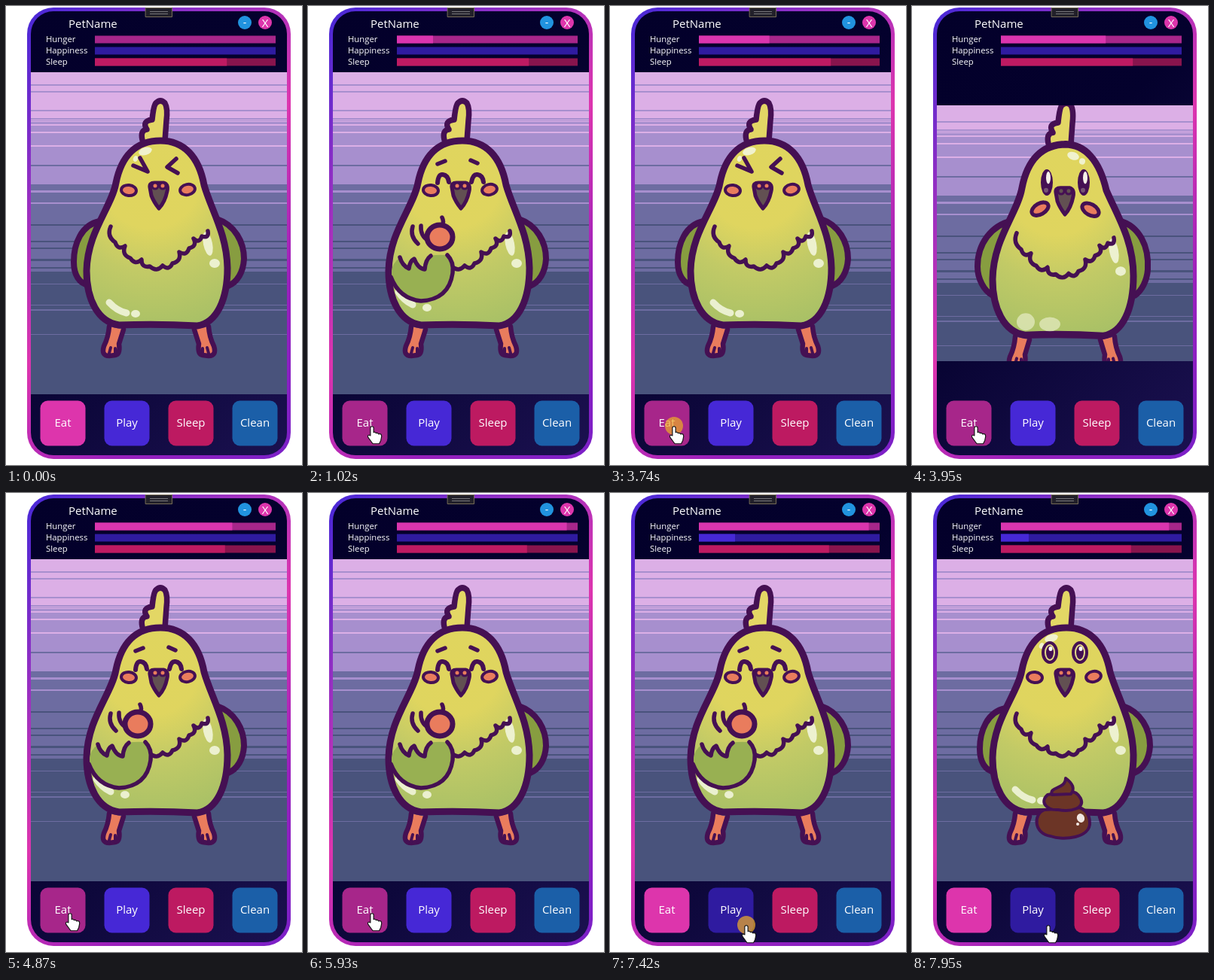
Write an HTML page with a canvas that moves like this. It is 393 by 610 pixels and loops after 8000 ms.

```html
<!DOCTYPE html>
<html lang="en">
<head>
<meta charset="utf-8">
<title>Desktop pet</title>
<style>
html, body { margin: 0; width: 100%; height: 100%; overflow: hidden; background: #fff; }
canvas { display: block; }
</style>
</head>
<body>
<canvas id="stage" width="393" height="610"></canvas>
<script>
const ctx = document.getElementById('stage').getContext('2d');
const LOOP = 8000;
const INK = '#451053', ORANGE = '#e97c5d', SHINE = 'rgba(243,246,222,.88)';
const FONT = '"Open Sans", "Noto Sans", sans-serif';
const BANDS = ['#dcafe6', '#a78fce', '#6d6ca1', '#49537c'];

// Step tracks: [time, value]
const POSE = [[0, 'squint'], [950, 'eat'], [1880, 'squint'], [2410, 'jump'], [2880, 'squint'],
  [3880, 'jump'], [4870, 'eat'], [5330, 'jump'], [5860, 'eat'], [6390, 'jump'],
  [6940, 'squint'], [7150, 'jump'], [7420, 'eat'], [7950, 'mess']];
const HUNGER = [[0, 0], [950, 20], [1880, 19], [2340, 39], [3810, 58], [4740, 77], [4870, 76],
  [5790, 95], [5860, 94], [7950, 93]];
const HAPPY = [[0, 0], [7420, 20], [7950, 15.4]];
const SLEEP = [[0, 73], [4870, 72]];
const CLICKS = [[950, 1020], [2340, 2480], [3740, 3880], [4740, 4870], [5790, 5930], [7420, 7490]];
const BUTTONS = [
  ['Eat', 45.5, '#dd35ac', '#a7268a'], ['Play', 130.5, '#4628d6', '#2f1ba0'],
  ['Sleep', 215.5, '#bd1a61', '#8a1450'], ['Clean', 300.5, '#1b5fa8', '#174f8c']];

const at = (track, t) => track.reduce((v, k) => t >= k[0] ? k[1] : v, track[0][1]);

function shape(d, fill, line = INK, width = 8) {
  const p = new Path2D(d);
  if (fill) { ctx.fillStyle = fill; ctx.fill(p); }
  if (line) { ctx.strokeStyle = line; ctx.lineWidth = width; ctx.stroke(p); }
}

function oval(x, y, rx, ry, fill, turn = 0, width = 0) {
  ctx.beginPath();
  ctx.ellipse(x, y, rx, ry, turn, 0, 7);
  ctx.fillStyle = fill;
  ctx.fill();
  if (width) { ctx.strokeStyle = INK; ctx.lineWidth = width; ctx.stroke(); }
}

function box(x, y, w, h, r, fill) {
  ctx.beginPath();
  ctx.roundRect(x, y, w, h, r);
  ctx.fillStyle = fill;
  ctx.fill();
}

function label(s, x, y, size, align = 'left') {
  ctx.font = '500 ' + size + 'px ' + FONT;
  ctx.textAlign = align;
  ctx.fillStyle = '#fff';
  ctx.fillText(s, x, y);
}

function withStops(g, ...stops) {
  stops.forEach(([p, c]) => g.addColorStop(p, c));
  return g;
}

function mirrored(draw) {
  draw();
  ctx.save();
  ctx.translate(406, 0);
  ctx.scale(-1, 1);
  draw();
  ctx.restore();
}

function sky(dy) {
  [88, 152, 239, 353].forEach((y, i) => {
    ctx.fillStyle = BANDS[i];
    ctx.fillRect(33, y + dy - (i ? 0 : 30), 340, 516 - y + 40);
  });
  // y, height, band colour
  [[104, 2, 1], [113, 2, 1], [138, 2, 1], [149, 2, 1], [153, 1, 0], [157, 2, 0], [167, 2, 0],
   [185, 2, 0], [211, 2, 2], [237, 2, 2], [245, 3, 1], [261, 2, 1], [290, 2, 3],
   [312, 2, 3], [321, 2, 3], [336, 3, 3], [347, 2, 3], [369, 1, 2],
   [397, 1, 2], [403, 2, 2], [436, 1, 2]].forEach(([y, h, c]) => {
    ctx.fillStyle = BANDS[c];
    ctx.fillRect(33, y + dy, 340, h);
  });
}

function scallops(from) {
  const pts = [[139, 293], [145, 314], [158, 319], [165, 335], [180, 337], [191, 346], [208, 345],
    [221, 342], [230, 327], [243, 322], [249, 309], [260, 306], [268, 299]].slice(from);
  let d = 'M' + pts[0];
  for (let i = 1; i < pts.length; i++) {
    const [ax, ay] = pts[i - 1], [bx, by] = pts[i];
    const len = Math.hypot(bx - ax, by - ay);
    const cx = (ax + bx) / 2 - (by - ay) / len * 9, cy = (ay + by) / 2 + (bx - ax) / len * 9;
    d += `Q${cx} ${cy} ${bx} ${by}`;
  }
  shape(d, null, INK, 5.5);
}

function foot() {
  shape('M137 426Q136 440 130 452Q126 465 137 465L145 464Q152 463 150 449L156 430', ORANGE, INK, 6.5);
  shape('M136 465L139 454M145 464L145 455', null, INK, 4);
}

function cheeksAndBeak(jump) {
  if (jump) {
    oval(170, 262, 12, 7, ORANGE, -.5, 5);
    oval(237, 263, 12, 7, ORANGE, .5, 5);
  } else {
    oval(163, 245, 10, 7, ORANGE, .1, 4);
    oval(241, 244, 10, 7, ORANGE, -.2, 4);
  }
  shape('M191 241Q190 235 197 235L209 235Q216 237 214 246Q211 261 203 269Q196 260 193 252Z', '#625052', INK, 5);
  const nostril = jump ? '#625052' : ORANGE;
  oval(198, 239, 4, 4, nostril, 0, 3);
  oval(208, 239, 4, 4, nostril, 0, 3);
}

const EYES = {
  squint() {
    shape('M178 202L188 220L169 212M226 203L214 214L228 222', null, INK, 5.5);
  },
  eat() {
    shape('M172 235Q173 223 179 224Q186 225 187 234M217 234Q219 223 225 224Q232 225 233 234', null, INK, 6);
    shape('M172 210L182 206M216 205L225 209', null, INK, 5.5);
  },
  jump() {
    [179, 228].forEach(x => {
      oval(x, 228, 8, 17, INK);
      oval(x + 2, 222, 3, 8, '#f5f1e8');
      oval(x - 1, 238, 3, 3, '#765374');
    });
  },
  mess() {
    [183, 223].forEach(x => {
      oval(x, 212, 9, 13, '#e4dc87', 0, 4);
      oval(x, 212, 5, 9, INK);
      oval(x + 1, 207, 2.5, 3, '#fff');
    });
  }
};

function foldedWing() {
  shape('M178 291Q181 287 178 281M139 293Q135 306 146 316M150 292Q149 306 160 312', null, INK, 5.5);
  oval(175, 307, 17, 16, ORANGE, 0, 7);
  shape('M111 352Q112 342 122 334Q125 345 134 349Q135 339 141 336Q146 349 155 350Q156 337 163 332Q169 330 185 331Q194 340 192 355Q187 390 150 392Q121 389 111 360Z', '#98b052', null);
  shape('M122 334Q125 345 134 349Q135 339 141 336Q146 349 155 350Q156 337 163 332M185 331Q194 340 192 355Q187 390 150 392Q121 389 110 360', null, INK, 5.5);
}

function mess() {
  const brown = '#6c3526';
  shape('M176 421C160 427 162 453 184 456C200 462 238 459 236 437Q235 422 222 418Z', brown, INK, 4);
  shape('M180 401C168 412 181 422 194 421C212 424 230 419 224 406Q219 396 207 396Z', brown, INK, 4);
  shape('M186 401C181 390 204 394 204 379Q219 390 211 400Z', brown, INK, 4);
  oval(224, 432, 5, 6, '#f1e7e2', -.4);
  oval(220, 440, 2, 2, '#f1e7e2');
}

function body(jump) {
  const right = jump ? 'C294 302 272 270 258 238C249 200 230 179 203 179'
                     : 'C293 302 272 270 263 238C256 200 236 179 205 179';
  const fill = withStops(ctx.createRadialGradient(192, 230, 0, 192, 230, 205),
    [0, '#e0d55d'], [.32, '#dfd55f'], [.6, '#c2ca66'], [1, '#a7c066']);
  shape('M205 179C172 179 153 200 146 235C140 268 108 300 107 352C107 390 122 420 150 424Q202 422 254 425C280 421 294 390 294 348' + right + 'Z', fill, INK, 9);
}

function bird(pose) {
  const jump = pose === 'jump', eat = pose === 'eat';
  const wing = '#879d40';
  ctx.save();
  if (jump) {
    ctx.translate(0, -1.5);
    ctx.scale(1, 1.035);
  }
  mirrored(foot);
  if (jump) {
    shape('M133 277C105 283 87 307 87 336C87 351 95 367 107 373', wing);
    shape('M275 277C302 284 315 310 313 340C312 354 305 367 296 373', wing);
  } else {
    if (!eat) shape('M124 286C100 291 90 316 90 340C90 357 97 369 110 371', wing);
    shape('M280 283C304 291 316 314 316 336C315 354 307 367 295 372', wing);
  }
  shape('M181 178Q178 165 187 164Q180 153 194 151Q196 132 199 129Q205 123 211 129Q215 136 213 152L211 179', '#e3d765', INK, 7.5);
  body(jump);
  if (jump) {
    oval(214, 194, 8, 5, SHINE, .3);
    oval(226, 201, 4, 4, SHINE, .3);
    oval(151, 407, 12, 11, 'rgba(240,243,214,.6)');
    oval(183, 410, 14, 9, 'rgba(240,243,214,.6)');
  } else if (eat) {
    shape('M120 380Q127 391 139 397', null, SHINE, 9);
    oval(158, 401, 6, 5, SHINE);
  } else {
    oval(185, 193, 9, 5, SHINE, -.3);
    oval(172, 203, 3, 4, SHINE, .4);
    oval(172, 409, 6, 5, SHINE);
    shape('M137 394Q147 405 160 408', null, SHINE, 9);
  }
  oval(268, 316, 6, 16, SHINE, -.2);
  oval(277, 342, 7, 6, SHINE);
  scallops(eat ? 5 : 0);
  if (eat) foldedWing();
  EYES[pose]();
  cheeksAndBeak(jump);
  if (pose === 'mess') mess();
  ctx.restore();
}

function cursorAt(t) {
  if (t < 130) return null;
  if (t < 6940) {
    const p = Math.min(1, Math.floor((t - 130) / 75 + .01) / 9);
    const e = 1 - (1 - p) ** 2;
    return [300 - 215 * e, 598 - 40 * e ** 2];
  }
  const q = Math.min(3, Math.floor((t - 6940) / 70)) / 3;
  return [98 + 83 * q, 558 + 16 * q];
}

function hand([x, y]) {
  ctx.save();
  ctx.translate(x, y);
  ctx.scale(1.06, 1.08);
  shape('M-2 2Q0 -1 2 2L2 8Q4 7 5 9Q7 8 8 10Q12 9 12 13L11 18L9 22L1 22L-5 14Q-6 10 -2 12Z', '#fff', '#111', 1.1);
  ctx.restore();
}

function bar(name, y, value, fill, empty) {
  label(name, 53, y + 9, 11.3);
  ctx.fillStyle = empty;
  ctx.fillRect(118, y + .5, 240, 10);
  ctx.fillStyle = fill;
  ctx.fillRect(118, y + .5, 2.4 * value, 10);
}

function header(t) {
  label('PetName', 83, 29, 15);
  oval(317, 22, 9, 9, '#2193df');
  oval(344, 22, 9, 9, '#dd35ac');
  label('-', 317, 27, 14, 'center');
  label('X', 344, 27.5, 15, 'center');
  bar('Hunger', 39, at(HUNGER, t), '#da35ae', '#a7268a');
  bar('Happiness', 54, at(HAPPY, t), '#4628d6', '#2f1ba0');
  bar('Sleep', 69, at(SLEEP, t), '#be1a62', '#88144d');
  ctx.fillStyle = '#22202a';
  ctx.fillRect(185, 2, 36, 13);
  ctx.strokeStyle = '#756b56';
  ctx.lineWidth = 1;
  ctx.strokeRect(185.5, 2.5, 35, 12);
  ctx.fillStyle = '#77777c';
  ctx.fillRect(191, 7, 24, 1);
  ctx.fillRect(191, 10, 24, 1);
}

function draw(t) {
  ctx.fillStyle = '#fff';
  ctx.fillRect(0, 0, 393, 610);
  box(28, 2, 350, 600, 35, withStops(ctx.createLinearGradient(28, 2, 503, 477),
    [0, '#4628d8'], [.5, '#dd35ae'], [.75, '#9a20bc'], [1, '#7a20c8']));
  box(33, 7, 340, 590, 30, withStops(ctx.createLinearGradient(33, 7, 498, 472),
    [0, '#03002a'], [.4, '#04012d'], [1, '#1b1150']));

  const pose = at(POSE, t), jump = pose === 'jump';
  ctx.save();
  ctx.beginPath();
  ctx.rect(33, jump ? 132 : 88, 340, jump ? 340 : 428);
  ctx.clip();
  sky(jump ? 15 : 0);
  bird(pose);
  ctx.restore();

  header(t);
  const tip = cursorAt(t);
  for (const [name, x, color, hover] of BUTTONS) {
    const over = tip && tip[0] >= x && tip[0] < x + 60 && tip[1] >= 525 && tip[1] < 585;
    box(x, 524.5, 60, 60, 10, over ? hover : color);
    label(name, x + 30, 559, 15, 'center');
  }
  if (tip) {
    if (CLICKS.some(([a, b]) => t >= a && t < b)) oval(tip[0], tip[1], 12, 12, 'rgba(235,170,40,.72)');
    hand(tip);
  }
}

ctx.lineJoin = ctx.lineCap = 'round';
const start = performance.now();
function tick() {
  draw((performance.now() - start) % LOOP);
  requestAnimationFrame(tick);
}
tick();
</script>
</body>
</html>
```
